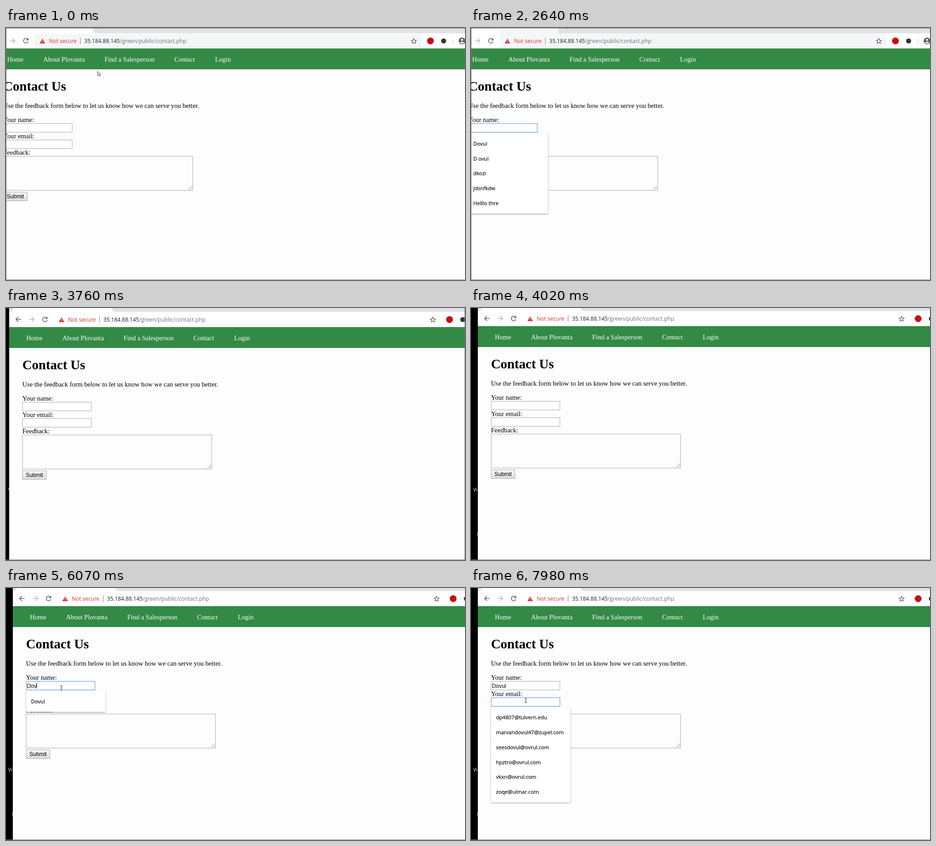
Write an HTML page that moves like this. It is 1009 px wide and 555 px high and loops after 8 s.

```html
<!DOCTYPE html>
<html lang="en">
<head>
<meta charset="utf-8">
<title>Contact form</title>
<style>
html, body { margin: 0; width: 100%; height: 100%; overflow: hidden; background: #000; }
svg { display: block; width: 1009px; height: 555px; }
text { white-space: pre; }
.serif { font: 14.59px "Liberation Serif", "Times New Roman", serif; }
.h1 { font: bold 29.1px "Liberation Serif", "Times New Roman", serif; }
.ui { font: 12.05px "Open Sans", "Noto Sans", sans-serif; }
.item { font: 11.5px "Open Sans", "Noto Sans", sans-serif; fill: #202124; stroke: #202124; stroke-width: .3; }
.field { font: 12.19px "Liberation Sans", Arial, sans-serif; }
.icon { fill: none; stroke: #5f6368; stroke-width: 1.5; }
.box { fill: #fff; stroke: #a9a9a9; }
.box.on { stroke: #4f8fe6; }
</style>
</head>
<body>
<svg viewBox="0 0 1009 555">
  <defs>
    <linearGradient id="face" x2="0" y2="1">
      <stop stop-color="#f8f8f8"/><stop offset="1" stop-color="#dcdcdc"/>
    </linearGradient>
    <filter id="shade" x="-10%" y="-10%" width="120%" height="130%">
      <feDropShadow dx="0" dy="1" stdDeviation="1" flood-opacity=".5"/>
    </filter>
  </defs>
  <rect width="1009" height="555" fill="#000"/>
  <g font-family="Open Sans, sans-serif" font-size="10" fill="#fff">
    <text x="5" y="404">Vi</text><text x="12.5" y="502" fill="#b8b49a">E</text>
  </g>

  <g id="window">
    <rect x="15" y="-40" width="1150" height="640" fill="#fdfdfd"/>
    <rect x="15" y="-40" width="1150" height="80" fill="#fff"/>
    <rect id="omnibox" x="113" width="850" rx="3"/>
    <path fill="#dee1e6" d="M15-40H1165V6.5H249Q241 6.5 241-1V-30H24V-1Q24 6.5 16 6.5H15Z"/>
    <circle cx="40" cy="-9" r="5.3" class="icon"/>
    <text x="55" y="-4.6" class="ui" fill="#3c4043">Contact Us</text>
    <path class="icon" d="M222.5-12.5l7 7m0-7l-7 7M261-12v9m-4.5-4.5h9"/>

    <path class="icon" d="M41 23H30M35.2 17.6L29.8 23l5.4 5.4"/>
    <path class="icon" style="stroke:#b5b7ba" d="M58.5 23H69.5M64.3 17.6L69.7 23l-5.4 5.4"/>
    <path class="icon" d="M97.8 19.8A5.2 5.2 0 1 0 98.7 24.8"/>
    <path fill="#5f6368" d="M99.3 17v5.3H94Z"/>
    <path fill="#d93025" d="M130 18.5L136 29H124Z"/>
    <path stroke="#fff" stroke-width="1.2" d="M130 22v3.3m0 1.1v1.3"/>
    <text class="ui" x="144.5" y="28.3" fill="#d93025">Not secure</text>
    <path stroke="#777b80" d="M213.5 16.5v14"/>
    <text class="ui" x="222" y="28.3" fill="#202124">35.184.88.145<tspan fill="#6b6f74">/green/public/contact.php</tspan></text>
    <path class="icon" style="stroke-width:1.3" id="star"/>
    <circle cx="983" cy="23.5" r="7.5" fill="#c90d0d"/>
    <circle cx="1012" cy="23.5" r="5.5" fill="#38332c"/>
    <path stroke="#d0d2d5" d="M1032.5 17v13"/>
    <circle cx="1052.5" cy="23.5" r="7.5" fill="#5f6368"/>
    <circle cx="1052.5" cy="21" r="2.3" fill="#fff"/>
    <path fill="#fff" d="M1047.8 27.5q4.7-4.5 9.4 0q-4.7 4-9.4 0Z"/>

    <rect x="15" y="40" width="1150" height="46" fill="#338a45"/>
    <g class="serif" fill="#fff" id="nav"></g>
    <text class="h1" x="44" y="132.6">Contact Us</text>
    <g class="serif">
      <text x="44" y="171">Use the feedback form below to let us know how we can serve you better.</text>
      <text x="44" y="202">Your name:</text>
      <text x="44" y="237.8">Your email:</text>
      <text x="44" y="273.5">Feedback:</text>
    </g>
    <rect class="box" x="44.5" y="205.5" width="151" height="19"/>
    <rect class="box" x="44.5" y="241.5" width="151" height="19"/>
    <rect x="44.5" y="277.5" width="416" height="75" fill="#fdfdfd" stroke="#a9a9a9"/>
    <path stroke="#888" d="M451 350.5l8-8m-4 8l4-4"/>
    <rect x="44.5" y="356.5" width="52" height="19" fill="url(#face)" stroke="#a9a9a9"/>
    <text class="field" x="51.5" y="370.2">Submit</text>
    <text class="field" x="46" y="219.5" id="name"></text>
    <path id="caret" stroke="#000" d="M0 0v12.5"/>
    <g id="menu"></g>
  </g>

  <g fill="#777">
    <path d="M0 554h1009v1H0Z"/>
    <path id="edgeStart" d="M0 0h1009v1H1v554H0Z"/>
    <path id="edgeEnd" d="M1008 0h1v555h-1Z"/>
  </g>
  <path id="arrow" fill="#fff" stroke="#333" stroke-width=".9" d="M.5.5V9.8L2.7 7.7 4.2 11 5.7 10.3 4.3 7.1H7.2Z"/>
  <path id="beam" fill="none" stroke="#222" d="M-2.5-4.5H-.7L0-4 .7-4.5H2.5M0-4V4M-2.5 4.5H-.7L0 4 .7 4.5H2.5"/>
</svg>
<script>
const LOOP = 8000;
const NAMES = ["Dovul", "D ovul", "dkozi", "jdsnfkdw", "Helllo thre"];
const EMAILS = ["dp4807@tulvern.edu", "marvandovul47@zupel.com", "seesdovul@ovrul.com",
  "hpztro@ovrul.com", "vkxn@ovrul.com", "zoqe@ulmar.com"];
const NAV = { "Home": 52.5, "About Plovanta": 132, "Find a Salesperson": 266.5, "Contact": 420, "Login": 509.5 };

const $ = id => document.getElementById(id);
const fields = document.querySelectorAll(".box");
const show = (id, on) => $(id).setAttribute("visibility", on ? "visible" : "hidden");
const place = (id, x, y) => $(id).setAttribute("transform", `translate(${x} ${y})`);

$("nav").innerHTML = Object.entries(NAV)
  .map(([label, x]) => `<text x="${x}" y="69">${label}</text>`).join("");
$("star").setAttribute("d", "M" + Array.from({ length: 10 }, (_, i) => {
  const r = i % 2 ? 2.7 : 6, a = (i / 5 - 0.5) * Math.PI;
  return `${(946.5 + r * Math.cos(a)).toFixed(2)} ${(24 + r * Math.sin(a)).toFixed(2)}`;
}).join("L") + "Z");

// Each cue changes part of the state at its time and holds until the next.
const cues = [[0, { dx: -50, dy: 5, x: 201, y: 95, cursor: "arrow", focus: -1, open: false,
  typed: "", caret: true, hover: false }]];
const cue = (time, change) => cues.push([time, change]);
const glide = (start, gap, cursor, points) =>
  points.forEach(([x, y], i) => cue(start + i * gap, { x, y, cursor }));

glide(160, 145.7, "arrow", [[187, 116], [165, 144], [139, 174], [112, 198]]);
glide(743, 145.7, "beam", [[91, 214], [82, 218]]);
cue(1034, { x: 80.5, y: 219.5, focus: 0 });
cue(1180, { open: true });
glide(2060, 145, "arrow", [[118, 176], [190, 104]]);
cue(2350, { x: 252, y: 29, cursor: "beam", hover: true });
cue(2495, { x: 292, y: 3, cursor: "arrow" });
cue(2640, { cursor: "" });

cue(3450, { dx: -38, dy: 5, focus: -1, open: false, hover: false });
cue(3590, { dx: -20, dy: 6 });
cue(3760, { dx: -8, dy: 2 });
cue(3890, { dx: -2, dy: -1 });
cue(4020, { dx: 0, dy: 0 });

glide(4290, 144.3, "arrow", [[524, 3], [436, 58], [334, 118], [236, 168], [164, 204]]);
cue(5011, { x: 126, y: 218, cursor: "beam" });
cue(5156, { x: 121.5, y: 220, focus: 0 });
cue(5300, { open: true });
[5730, 5910, 6070, 6220, 6370].forEach((time, i) => cue(time, { typed: NAMES[0].slice(0, i + 1) }));

glide(6960, 145, "beam", [[121, 228], [120.5, 240], [120.5, 248]]);
cue(7395, { focus: 1, open: false });
cue(7540, { open: true });
cue(7980, { caret: false });

const stateAt = time => Object.assign({}, ...cues.filter(c => c[0] <= time).map(c => c[1]));

function suggestions({ focus, open, typed }) {
  if (!open) return [];
  if (focus) return EMAILS;
  const start = typed.toLowerCase();
  return typed === NAMES[0] ? [] : NAMES.filter(n => n.toLowerCase().startsWith(start));
}

function drawMenu(items, top) {
  const height = 47 + 32.75 * (items.length - 1);
  $("menu").innerHTML = items.length
    ? `<rect x="44" y="${top}" width="175" height="${height}" rx="3" fill="#fff" filter="url(#shade)"/>` +
      items.map((s, i) => `<text class="item" x="55" y="${top + 27.8 + i * 32.75}">${s}</text>`).join("")
    : "";
}

let last = "";
function render(time) {
  const s = stateAt(time), key = JSON.stringify(s);
  if (key === last) return;
  last = key;
  const moved = time >= 3450;
  place("window", s.dx, s.dy);
  $("omnibox").setAttribute("y", s.hover ? -2 : 8);
  $("omnibox").setAttribute("height", s.hover ? 39 : 29);
  $("omnibox").setAttribute("fill", moved ? "#fff" : "#f5f6f8");
  fields.forEach((f, i) => f.classList.toggle("on", i === s.focus));
  $("name").textContent = s.typed;
  const typedWidth = s.focus === 0 && s.typed ? $("name").getComputedTextLength() : 0;
  place("caret", Math.floor(46 + typedWidth) + 0.5, s.focus === 1 ? 244.5 : 209);
  show("caret", s.focus >= 0 && s.caret);
  drawMenu(suggestions(s), s.focus === 1 ? 261.5 : 226);
  show("edgeStart", !moved);
  show("edgeEnd", moved && time < 3890);
  for (const id of ["arrow", "beam"]) {
    place(id, s.x, s.y);
    show(id, s.cursor === id);
  }
}

const begin = performance.now();
function tick() {
  render((performance.now() - begin) % LOOP);
  requestAnimationFrame(tick);
}
tick();
</script>
</body>
</html>
```
